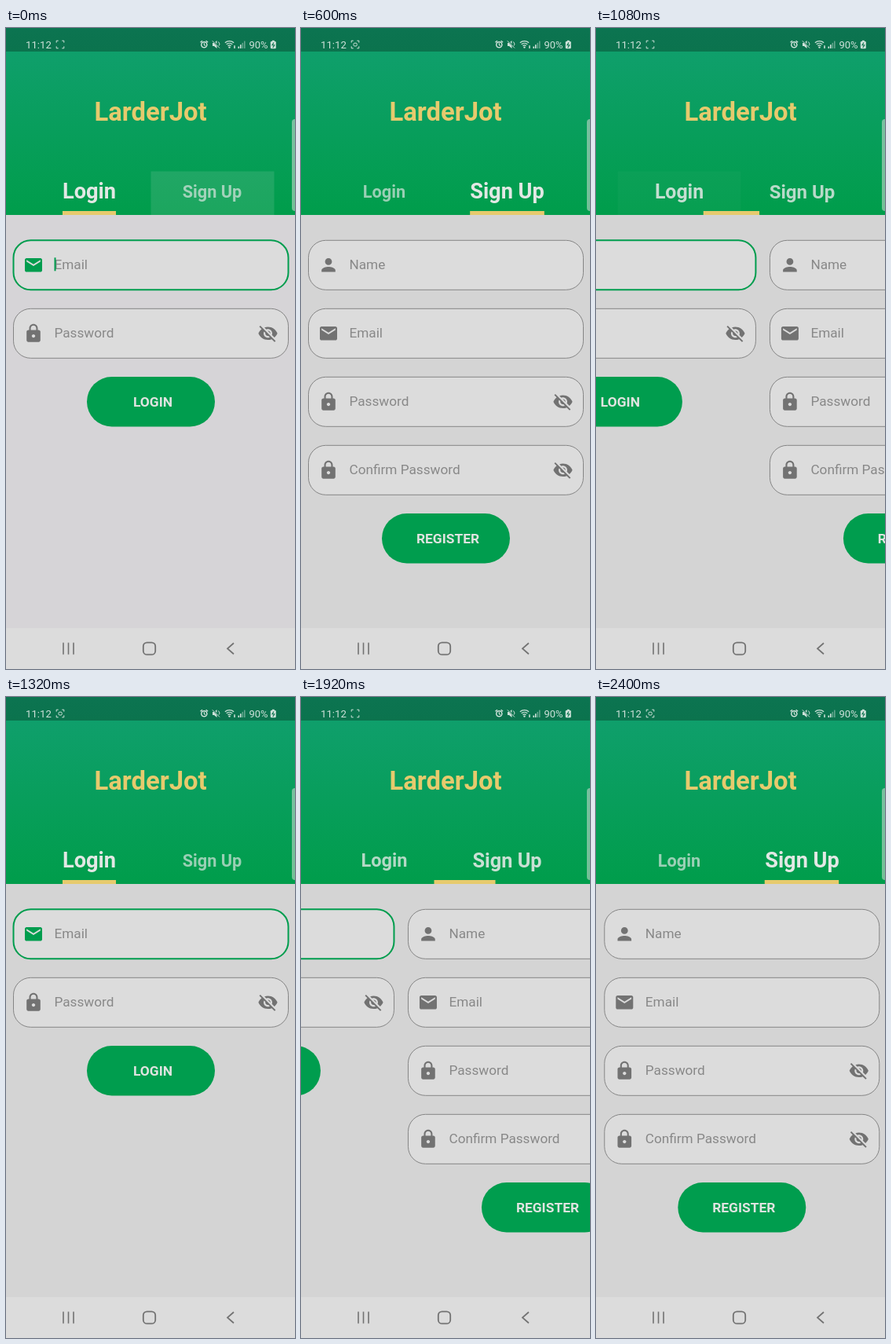
An HTML page with a canvas for the animation above (2.52 s loop, 368 by 816 pixels).

```html
<!DOCTYPE html>
<html lang="en">
<head>
<meta charset="utf-8">
<title>LarderJot</title>
<style>
  html, body { margin: 0; width: 100%; height: 100%; overflow: hidden; background: #d4d4d4; }
  canvas { display: block; width: 368px; height: 816px; }
</style>
</head>
<body>
<canvas id="stage"></canvas>
<script>
const W = 368, H = 816, LOOP = 2520, STEP = 120;
const GREEN = '#009d4e', GOLD = '#e6ca6d', GREY = '#727272', STATUS = '#cfe2da';
const canvas = document.getElementById('stage');
const ctx = canvas.getContext('2d');
const ratio = window.devicePixelRatio || 1;
canvas.width = W * ratio;
canvas.height = H * ratio;

const ICONS = {
  mail: 'M20 4H4c-1.1 0-2 .9-2 2v12c0 1.1.9 2 2 2h16c1.1 0 2-.9 2-2V6c0-1.1-.9-2-2-2zm0 4l-8 5-8-5V6l8 5 8-5v2z',
  person: 'M12 12c2.21 0 4-1.79 4-4s-1.79-4-4-4-4 1.79-4 4 1.79 4 4 4zm0 2c-2.67 0-8 1.34-8 4v2h16v-2c0-2.66-5.33-4-8-4z',
  lock: 'M18 8h-1V6c0-2.76-2.24-5-5-5S7 3.24 7 6v2H6c-1.1 0-2 .9-2 2v10c0 1.1.9 2 2 2h12c1.1 0 2-.9 2-2V10c0-1.1-.9-2-2-2zm-6 9c-1.1 0-2-.9-2-2s.9-2 2-2 2 .9 2 2-.9 2-2 2zm3.1-9H8.9V6c0-1.71 1.39-3.1 3.1-3.1s3.1 1.39 3.1 3.1v2z',
  hidden: 'M12 7c2.76 0 5 2.24 5 5 0 .65-.13 1.26-.36 1.83l2.92 2.92c1.51-1.26 2.7-2.89 3.43-4.75-1.73-4.39-6-7.5-11-7.5-1.4 0-2.74.25-3.98.7l2.16 2.16C10.74 7.13 11.35 7 12 7zM2 4.27l2.74 2.74C3.08 8.3 1.78 10.02 1 12c1.73 4.39 6 7.5 11 7.5 1.55 0 3.03-.3 4.38-.84L19.73 22 21 20.73 3.27 3 2 4.27zM7.53 9.8l1.55 1.55c-.05.21-.08.43-.08.65 0 1.66 1.34 3 3 3 .22 0 .44-.03.65-.08l1.55 1.55c-.67.33-1.41.53-2.2.53-2.76 0-5-2.24-5-5 0-.79.2-1.53.53-2.2zm4.31-.78l3.15 3.15.02-.16c0-1.66-1.34-3-3-3l-.17.01z'
};
for (const name in ICONS) ICONS[name] = new Path2D(ICONS[name]);

const LOGIN = {
  fields: [['mail', 'Email', true], ['lock', 'Password']],
  button: 'LOGIN'
};
const SIGN_UP = {
  fields: [['person', 'Name'], ['mail', 'Email'], ['lock', 'Password'], ['lock', 'Confirm Password']],
  button: 'REGISTER'
};

const lerp = (a, b, k) => a + (b - a) * k;
const clamp = x => Math.min(1, Math.max(0, x));

// cubic-bezier(.25, .1, .25, 1)
function ease(x) {
  x = clamp(x);
  let lo = 0, hi = 1;
  for (let i = 0; i < 24; i++) {
    const u = (lo + hi) / 2, v = 1 - u;
    if (.75 * v * v * u + .75 * v * u * u + u ** 3 < x) lo = u; else hi = u;
  }
  return .3 * (1 - lo) ** 2 * lo + 3 * (1 - lo) * lo * lo + lo ** 3;
}

// 0 shows the login page, 1 the sign-up page
function pagePosition(t) {
  if (t < 960) return ease(t / 253);
  if (t < 1560) return 1 - ease((t - 980) / 300);
  if (t < 1920) return .655 * ((t - 1560) / 360) ** 3.5;
  return 1 - .345 * Math.exp((1920 - t) / 104.6);
}

function rect(x, y, w, h, color) {
  ctx.fillStyle = color;
  ctx.fillRect(x, y, w, h);
}

function roundBox(x, y, w, h, r) {
  ctx.beginPath();
  ctx.roundRect(x, y, w, h, r);
}

function text(str, x, y, size, color, weight = 400, align = 'left') {
  ctx.font = `${weight} ${size}px Roboto, sans-serif`;
  ctx.textAlign = align;
  ctx.fillStyle = color;
  ctx.fillText(str, x, y);
}

function line(points, color, width) {
  ctx.beginPath();
  points.forEach(([x, y]) => ctx.lineTo(x, y));
  ctx.strokeStyle = color;
  ctx.lineWidth = width;
  ctx.stroke();
}

function icon(name, cx, cy, color) {
  ctx.save();
  ctx.translate(cx, cy);
  ctx.scale(1.1, 1.1);
  ctx.translate(-12, -12);
  ctx.fillStyle = color;
  ctx.fill(ICONS[name]);
  ctx.restore();
}

function field(y, [name, label, focused], cursor) {
  roundBox(9.5, y, 350, 63, 22);
  ctx.fillStyle = '#dcdcdc';
  ctx.fill();
  ctx.strokeStyle = focused ? GREEN : '#858585';
  ctx.lineWidth = focused ? 2 : 1;
  ctx.stroke();
  icon(name, 35, y + 31.5, focused ? GREEN : GREY);
  text(label, 61.5, y + 36.7, 17.2, '#888');
  if (name === 'lock') icon('hidden', 333.5, y + 31.5, GREY);
  if (focused && cursor) rect(61.5, y + 22, 2, 17, GREEN);
}

function page(x, { fields, button }, cursor) {
  if (Math.abs(x) >= W) return;
  ctx.save();
  ctx.translate(x, 0);
  fields.forEach((f, i) => field(270.3 + 87 * i, f, cursor));
  const y = 270.3 + 87 * fields.length;
  roundBox(103, y - .3, 163, 63.5, 31.7);
  ctx.fillStyle = GREEN;
  ctx.fill();
  text(button, 187, y + 37.3, 17.4, '#e0e4e1', 700, 'center');
  ctx.restore();
}

// Draws a tab label and returns its left and right edges.
function tab(label, cx, active) {
  const size = lerp(21.7, 27.2, active);
  text(label, cx, 212.3 + .175 * size, size, `rgba(226,232,228,${lerp(.68, 1, active)})`, 700, 'center');
  const half = ctx.measureText(label).width / 2;
  return [cx - half, cx + half];
}

function header(t, p) {
  const shade = ctx.createLinearGradient(0, 0, 0, 238);
  shade.addColorStop(0, '#10a070');
  shade.addColorStop(.13, '#0f9f6b');
  shade.addColorStop(1, '#009d4b');
  rect(0, 0, W, 238, shade);
  rect(0, 0, W, 30, 'rgba(0,0,0,.28)');
  text('LarderJot', 184, 118, 32.8, GOLD, 700, 'center');

  const signUpPress = t < 240 ? .12 * (1 - t / 240) : 0;
  const loginPress = t >= 960 && t < 1320 ? .05 * (1 - (t - 960) / 360) : 0;
  rect(184.5, 182.5, 157, 55.5, `rgba(225,225,225,${signUpPress})`);
  rect(27.5, 182.5, 157, 55.5, `rgba(225,225,225,${loginPress})`);

  const a = tab('Login', 106, 1 - p);
  const b = tab('Sign Up', 262.5, p);
  const left = lerp(a[0], b[0], p), right = lerp(a[1], b[1], p);
  rect(left, 233, right - left, 5, GOLD);

  roundBox(364, 116, 8, 117, 4);
  ctx.fillStyle = 'rgba(195,215,203,.6)';
  ctx.fill();
}

function captureMark(dot) {
  for (const sx of [-1, 1]) for (const sy of [-1, 1]) {
    const x = 69 + sx * 4.8, y = 21 + sy * 4.8;
    line([[x - sx * 2.5, y], [x, y], [x, y - sy * 2.5]], STATUS, 1);
  }
  if (!dot) return;
  roundBox(67, 19.2, 4.2, 3.8, 1.2);
  ctx.strokeStyle = STATUS;
  ctx.stroke();
}

function disc(x, y, r, color) {
  ctx.beginPath();
  ctx.arc(x, y, r, 0, 7);
  ctx.fillStyle = color;
  ctx.fill();
}

function statusBar(dot) {
  const dark = '#0a714c', faint = 'rgba(207,226,218,.45)';
  text('11:12', 25, 25.8, 13.2, STATUS);
  captureMark(dot);

  // Alarm
  disc(252.3, 21.3, 4.3, STATUS);
  line([[247.5, 18.2], [250, 16.2]], STATUS, 1.4);
  line([[254.6, 16.2], [257.1, 18.2]], STATUS, 1.4);
  disc(252.3, 21.3, 2.8, dark);
  line([[252.3, 19], [252.3, 21.6], [254.2, 22.6]], STATUS, 1.1);

  // Muted speaker
  ctx.beginPath();
  [[263, 19], [265, 19], [268.5, 16], [268.5, 26], [265, 23], [263, 23]].forEach(q => ctx.lineTo(...q));
  ctx.fillStyle = STATUS;
  ctx.fill();
  line([[263, 16], [272.5, 25.5]], dark, 2);
  line([[262.8, 16.3], [272, 25.5]], STATUS, 1);
  line([[270.5, 17.5], [272, 20.5], [271, 22.5]], STATUS, 1);

  // Wi-Fi
  for (const r of [3, 5.7, 8.4]) {
    ctx.beginPath();
    ctx.arc(284.5, 25, r, -2.3, -.84);
    ctx.strokeStyle = STATUS;
    ctx.lineWidth = 1.3;
    ctx.stroke();
  }
  disc(284.5, 24.6, 1.2, STATUS);
  line([[291, 22.3], [291, 26]], STATUS, 1.5);

  // Signal and battery
  for (let i = 0; i < 4; i++) rect(295.5 + i * 2.5, 23.5 - i * 2.3, 1.6, 2.5 + i * 2.3, i < 2 ? STATUS : faint);
  text('90%', 309.5, 25.8, 13, STATUS);
  rect(338.8, 15.8, 3, 2, STATUS);
  roundBox(336.8, 17, 7, 9.3, 1.2);
  ctx.fillStyle = STATUS;
  ctx.fill();
  line([[341, 18.5], [339, 21.7], [341.8, 21.7], [339.8, 25]], dark, 1.1);
}

function navigation() {
  rect(0, 764, W, 52, '#dcdcdc');
  for (const x of [73, 79.5, 86]) line([[x, 782.5], [x, 797.5]], GREY, 1.6);
  roundBox(174.8, 782.3, 15.4, 15.4, 4.8);
  ctx.lineWidth = 1.8;
  ctx.stroke();
  line([[290, 783], [282, 790], [290, 797]], GREY, 1.7);
}

function draw(t) {
  const p = pagePosition(t);
  const cursor = t < 480 || t >= 1440 && t < 1940;
  const dot = t % 960 > 240 && t % 960 < 720;
  ctx.setTransform(ratio, 0, 0, ratio, 0, 0);
  rect(0, 0, W, H, t < 600 ? '#d6d4d7' : '#d4d4d4');
  page(-p * W, LOGIN, cursor);
  page((1 - p) * W, SIGN_UP, false);
  header(t, p);
  statusBar(dot);
  navigation();
}

const start = performance.now();
function tick() {
  const t = (performance.now() - start) % LOOP;
  draw(Math.floor(t / STEP) * STEP);
  requestAnimationFrame(tick);
}
tick();
</script>
</body>
</html>
```
